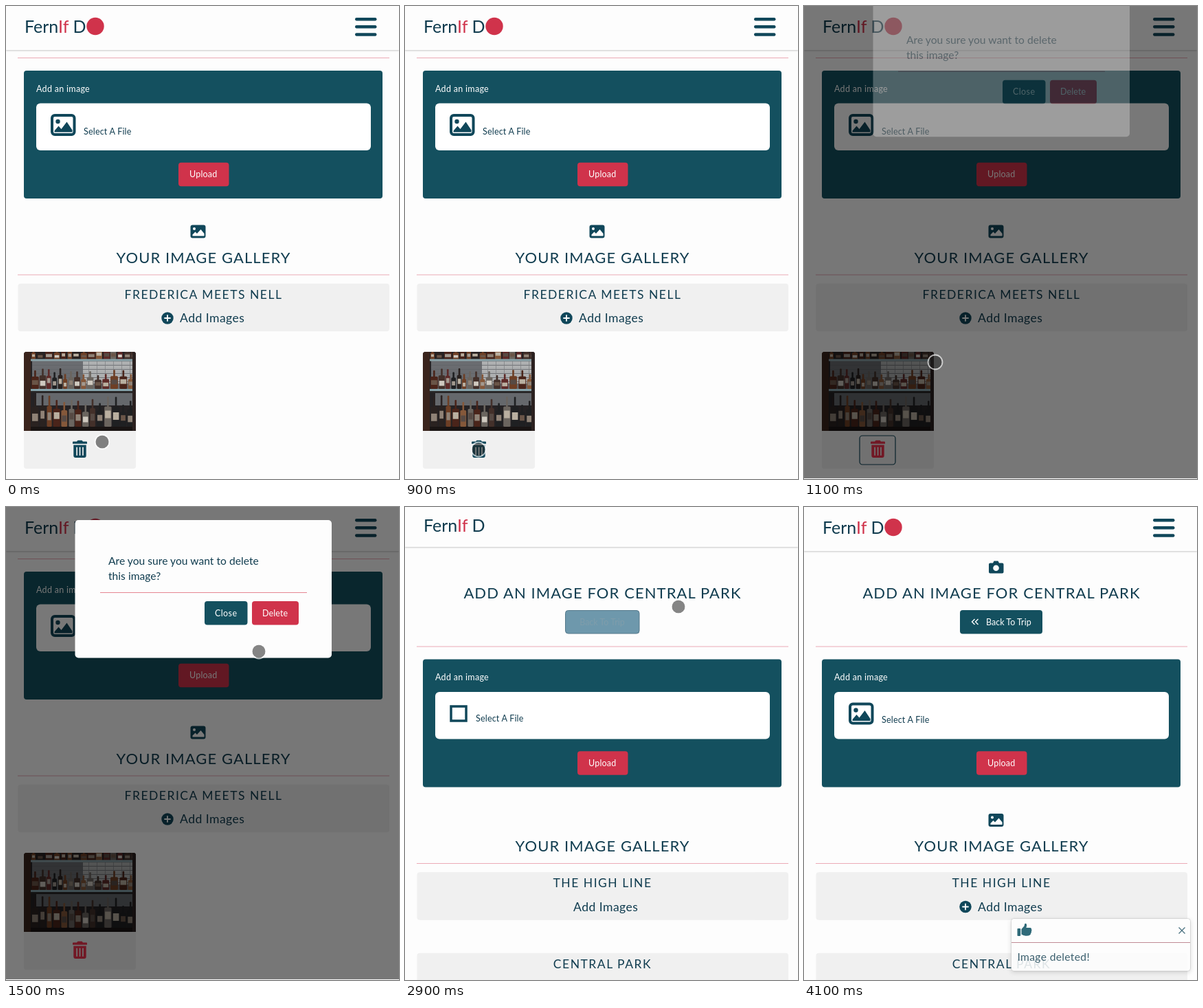
Write an HTML page that moves like this. It is 572 px wide and 688 px high and loops after 4200 ms.

```html
<!DOCTYPE html>
<html lang="en">
<head>
<meta charset="utf-8">
<title>Image gallery</title>
<style>
  html, body { margin: 0; width: 100%; height: 100%; overflow: hidden; background: #fdfdfd; }
  svg { display: block; }
  text { font-family: Lato, "Open Sans", sans-serif; white-space: pre; }
</style>
</head>
<body>
<svg id="stage" width="572" height="688" viewBox="0 0 572 688"></svg>
<script>
const INK = '#103c4f', TEAL = '#14505f', ICON = '#10475a', RED = '#d0334b', PAPER = '#fdfdfd', GREY = '#f0f0f0';
const LOOP = 4200, STEP = 100, SCROLL = 127.5;

const rect = (x, y, w, h, fill, r = 0, more = '') =>
  `<rect x="${x}" y="${y}" width="${w}" height="${h}" rx="${r}" fill="${fill}" ${more}/>`;
const circle = (x, y, r, fill, more = '') => `<circle cx="${x}" cy="${y}" r="${r}" fill="${fill}" ${more}/>`;
const path = (d, fill, more = '') => `<path d="${d}" fill="${fill}" ${more}/>`;
const group = (id, body) => `<g id="${id}">${body}</g>`;
const text = (x, y, str, size, fill = INK, gap = 0, anchor = 'start') =>
  `<text x="${x}" y="${y}" font-size="${size}" fill="${fill}" letter-spacing="${gap}" text-anchor="${anchor}">${str}</text>`;
const title = (y, str) => text(287.5, y, str, 22, INK, 1.08, 'middle');
const rule = y => rect(17, y, 541, 1, '#ecaab6');
const button = (x, y, w, fill, label, labelX, gap, more = '') =>
  rect(x, y, w, 34.5, fill, 4, more) + text(labelX, y + 21.7, label, 12.5, '#fff', gap);

// Small filled picture icon
const picture = y =>
  rect(268.5, y, 22, 19, ICON, 3) + circle(274, y + 5.5, 2, '#fff') +
  path(`M271.5 ${y + 16}v-2l4-4 2.5 2.5 5.5-6 5 6v3.5z`, '#fff');

// Large outlined picture icon
const bigPicture =
  rect(67, 286.5, 32.5, 28, 'none', 4, `stroke="${ICON}" stroke-width="4"`) +
  circle(75.5, 295.5, 3.2, ICON) +
  path('M70.5 311v-2l6-7 4 4.5 8-10.500 8 12v3z', ICON);

const plus = y =>
  circle(235, y, 8.7, ICON) +
  path(`M231 ${y}h8M235 ${y - 4}v8`, 'none', 'stroke="#fff" stroke-width="1.8" stroke-linecap="round"');

const bar = (y, h, name) =>
  rect(17.5, y, 540.5, h, GREY, 4) + text(287.5, y + 22, name, 17.5, INK, 1.5, 'middle');

const addImages = withIcon =>
  (withIcon ? plus(581.5) : '') + text(withIcon ? 253 : 245, 587.7, 'Add Images', 17.6, INK, .45);

function random(seed) {
  return () => (seed = seed * 16807 % 2147483647) / 2147483647;
}

// Shelves of bottles against a tiled wall
function photo() {
  const rnd = random(77), pick = list => list[Math.floor(rnd() * list.length)];
  const glass = ['#4a241a', '#6e3f25', '#2a2220', '#85583a', '#1f2022', '#43302a', '#5e2a28', '#6b655f'];
  const label = ['#b9afa0', '#8f8276', '#cfc9c0', '#6a5548', '#a39a90', '#574a44'];
  let s = rect(26, 503, 163, 115, '#252224') + rect(38, 516, 150, 42, '#6a6c70') +
    rect(112, 517, 72, 32, '#aeb0b1') + rect(44, 563, 140, 18, '#65686c');
  for (let y = 522; y < 548; y += 6) s += rect(38, y, 146, .8, '#62656a');
  for (let x = 120; x < 184; x += 12) s += rect(x, 517, .7, 32, '#7c7f82');
  const row = (base, low, high) => {
    for (let x = 37; x < 182;) {
      const w = 6 + rnd() * 5, h = low + rnd() * (high - low), top = base - h, c = pick(glass);
      s += rect(x + w / 2 - 1.3, top, 2.6, h * .5, c, 1) + rect(x, top + h * .33, w, h * .67, c, 1.5) +
        rect(x + 1, top + h * (.45 + rnd() * .15), w - 2, h * .25, pick(label));
      x += w + .6 + rnd() * 2;
    }
  };
  row(514, 14, 20);
  s += rect(35, 513.5, 153, 3, '#8aa3a9');
  row(557, 20, 32);
  s += rect(35, 557, 153, 3, '#86a4ac') + rect(35, 560, 153, 2, '#2b2a2a');
  row(612, 32, 46);
  s += rect(26, 612, 163, 6, '#191413') + rect(26, 503, 10, 115, '#3a241c') + rect(184, 503, 5, 115, '#2b2120');
  return `<clipPath id="top"><path d="M26 618V507q0-4 4-4h155q4 0 4 4v111z"/></clipPath><g clip-path="url(#top)">${s}</g>`;
}

const trash = group('bin',
  path('M97 634.500q0-1 1-1h5l1.500-1.800h6l1.500 1.800h5q1 0 1 1v2.200h-21z', 'currentColor') +
  path('M98.300 638.500h18.400v15.500q0 3-3 3h-12.400q-3 0-3-3z', 'currentColor') +
  [102.3, 106.7, 111.1].map(x => rect(x, 641.5, 1.7, 12.5, GREY, .8)).join(''));

const card = rect(26, 503, 163, 170, GREY, 4) + photo() +
  rect(81, 625, 52, 42, 'none', 4, `id="focus" stroke="${ICON}" stroke-width="1.2"`) + trash;

const form =
  rect(26, 221.5, 522, 186, TEAL, 4) + text(44, 252.3, 'Add an image', 12.5, '#fff', .3) +
  rect(44, 269, 487, 68.5, '#fff', 6) +
  button(251, 355.2, 73.5, RED, 'Upload', 267, .2);

const common = title(132.7, 'ADD AN IMAGE FOR CENTRAL PARK') + rule(202.5) + form +
  title(501, 'YOUR IMAGE GALLERY') + rule(518);

const icons =
  path('M271 81.500h4l1.500-3h6l1.500 3h4.500q2 0 2 2v11q0 2-2 2h-17.500q-2 0-2-2v-11q0-2 2-2z', ICON) +
  circle(279.5, 88.7, 4.3, '#fff') +
  button(227, 150, 120, TEAL, 'Back To Trip', 265, 0) +
  path('M248.500 163l-4 4 4 4M253.500 163l-4 4 4 4', 'none', 'stroke="#fff" stroke-width="1.4"') +
  bigPicture + text(113, 314.3, 'Select A File', 12.5, INK, .2) + picture(446) + addImages(true);

// The page before its icons are there
const bare =
  rect(233.5, 150.5, 107.5, 33.5, '#6e98ac', 4, 'stroke="#55798b"') +
  text(287, 171.6, 'Back To Trip', 12.5, '#7f9dab', 0, 'middle') +
  rect(67, 290, 22, 21, 'none', 0, `stroke="${ICON}" stroke-width="3.5"`) +
  text(103, 312.3, 'Select A File', 12.5, INK, .2) + addImages(false);

const header =
  rect(0, 0, 572, 64, PAPER, 0, 'filter="url(#soft)"') +
  group('brand', `<text x="27" y="39" font-size="25" fill="${INK}">Fern<tspan fill="${RED}">If</tspan> D</text>`) +
  group('marks', circle(130, 29.5, 12.7, RED) +
    [17, 28, 39.3].map(y => rect(508, y, 31.5, 4.5, ICON, 2.2)).join(''));

const modal =
  rect(100.5, 19, 373.5, 200.5, PAPER, 5) +
  text(149, 84, 'Are you sure you want to delete', 15.6, INK, .03) + text(149, 106.3, 'this image?', 15.6, INK, .03) +
  rect(137, 124, 301, 1, '#e58592') +
  button(289, 137, 62.5, TEAL, 'Close', 304, .4) +
  button(358, 137, 68, RED, 'Delete', 373, .1, 'id="del"');

const toast =
  rect(301.5, 598.5, 261, 76.5, '#fff', 4, 'fill-opacity=".85" stroke="#000" stroke-opacity=".13" filter="url(#lift)"') +
  rect(302, 633, 260, 1, '#c08a94') +
  rect(310.5, 613, 4.7, 11, '#2f6a79', 1) +
  path('M316.500 614l4-4.500.7-3q1-1.500 2.600 0 1 2-.4 5.500h6q2 .3 1.700 2.300 1 1.500-.2 3 .6 1.700-.8 2.800 0 2-1.600 2.700-1.200 1.200-6 1-3.500-.3-6-2.300z', '#2f6a79') +
  path('M545.500 611.500l9 9M554.500 611.500l-9 9', 'none', 'stroke="#4a7180" stroke-width="1.3"') +
  text(310.5, 660, 'Image deleted!', 15.6, '#3b5f6d', .35);

document.getElementById('stage').innerHTML = `<defs>
  <filter id="soft" x="-5%" y="-10%" width="110%" height="140%"><feDropShadow dx="0" dy="1" stdDeviation="1.3" flood-opacity=".22"/></filter>
  <filter id="lift" x="-10%" y="-20%" width="120%" height="150%"><feDropShadow dx="0" dy="2" stdDeviation="3" flood-opacity=".16"/></filter>
</defs>` + rect(0, 0, 572, 688, PAPER) +
  group('page', common +
    group('before', bar(531.2, 69.5, 'FREDERICA MEETS NELL')) +
    group('after', bar(531.2, 69.5, 'THE HIGH LINE') + bar(648.7, 69.5, 'CENTRAL PARK')) +
    group('icons', icons) + group('bare', bare)) +
  group('card', card) + group('header', header) +
  rect(0, 0, 572, 687, '#000', 0, 'id="shade"') + group('modal', modal) + group('toast', toast) +
  group('cursor', circle(0, 0, 9.6, '#222', 'fill-opacity=".55"') +
    circle(0, 0, 10.5, 'none', 'stroke="#fff" stroke-opacity=".65" stroke-width="1.8"'));

const el = id => document.getElementById(id);
const show = (id, on) => el(id).setAttribute('visibility', on ? 'visible' : 'hidden');
const fade = (id, v) => el(id).setAttribute('opacity', v);
const move = (id, x, y) => el(id).setAttribute('transform', `translate(${x} ${y})`);
const ramp = (t, from, length) => Math.min(1, Math.max(0, (t - from) / length));

// time, x, y
const track = [
  [0, 140, 634], [400, 109, 644], [600, 107, 645], [920, 107, 645], [1100, 191, 518], [1500, 368, 210],
  [1800, 396, 168], [2000, 401, 162], [2500, 401, 162], [2900, 398, 145], [3500, 398, -20], [LOOP, 398, -20]
];
function pointer(t) {
  const i = track.findIndex(k => k[0] > t), a = track[i - 1], b = track[i], p = ramp(t, a[0], b[0] - a[0]);
  return [a[1] + (b[1] - a[1]) * p, a[2] + (b[2] - a[2]) * p];
}

function render(t) {
  const fresh = t >= 2900, loaded = !fresh || t >= 3000;
  move('page', 0, fresh ? 0 : -SCROLL);
  for (const id of ['before', 'card']) show(id, !fresh);
  show('after', fresh);
  for (const id of ['icons', 'marks']) show(id, loaded);
  show('bare', !loaded);
  move('header', 0, loaded ? 0 : -6);
  move('brand', 0, loaded ? 0 : 3);

  show('focus', t >= 1000 && t < 1200);
  el('bin').style.color = t >= 1000 && t < 1900 ? '#f0344f' : ICON;
  el('del').setAttribute('fill', t >= 1900 ? '#ac2a3e' : RED);

  fade('shade', fresh ? 0 : .53 * ramp(t, 940, 150));
  const p = ramp(t, 1030, 260);
  fade('modal', fresh ? 0 : ramp(t, 1030, 250));
  move('modal', 0, -50 * Math.pow(1 - p, 1.7));
  fade('toast', ramp(t, 3050, 150));
  move('cursor', ...pointer(t));
}

const start = performance.now();
function tick() {
  const t = (performance.now() - start + 20) % LOOP;
  render(Math.floor(t / STEP) * STEP);
  requestAnimationFrame(tick);
}
tick();
</script>
</body>
</html>
```
